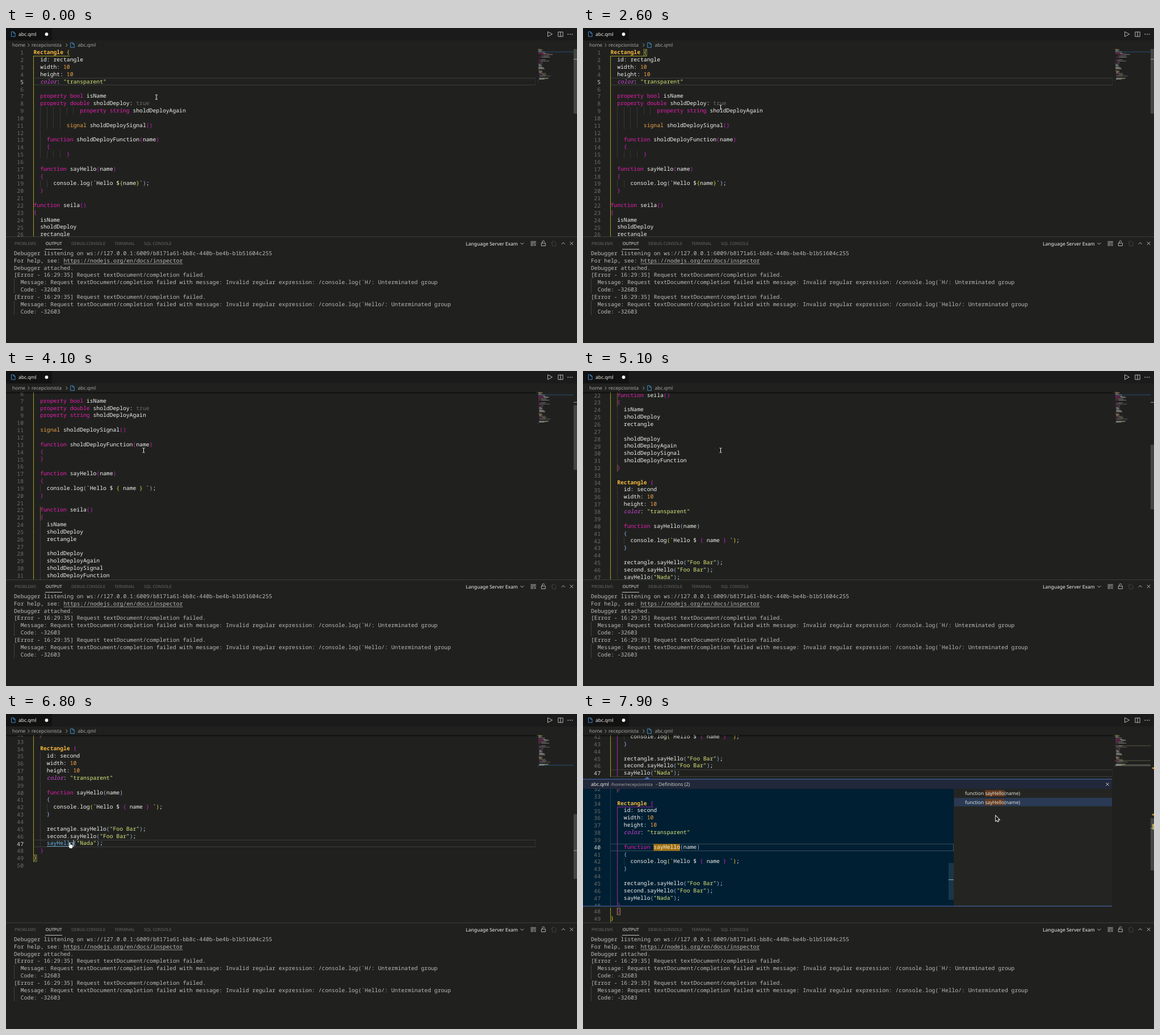
An HTML page with a canvas for the animation above (8 s loop, 1006 px wide and 556 px high).

```html
<!DOCTYPE html>
<html lang="en">
<head>
<meta charset="utf-8">
<title>Editor</title>
<style>
html, body { margin: 0; width: 100%; height: 100%; overflow: hidden; background: #20211f; }
canvas { display: block; }
</style>
</head>
<body>
<canvas id="stage" width="1006" height="556"></canvas>
<script type="text/plain" id="code">Rectangle {
  id: rectangle
  width: 10
  height: 10
  color: "transparent"

  property bool isName
  property double sholdDeploy: true
  property string sholdDeployAgain

  signal sholdDeploySignal()

  function sholdDeployFunction(name)
  {
  }

  function sayHello(name)
  {
    console.log(`Hello $ { name } `);
  }

  function seila()
  {
    isName
    sholdDeploy
    rectangle

    sholdDeploy
    sholdDeployAgain
    sholdDeploySignal
    sholdDeployFunction
  }

  Rectangle {
    id: second
    width: 10
    height: 10
    color: "transparent"

    function sayHello(name)
    {
      console.log(`Hello $ { name } `);
    }

    rectangle.sayHello("Foo Bar");
    second.sayHello("Foo Bar");
    sayHello("Nada");
  }
}
</script>
<script type="text/plain" id="log">Debugger listening on ws://127.0.0.1:6009/b8171a61-bb8c-440b-be4b-b1b51604c255
For help, see: https://nodejs.org/en/docs/inspector
Debugger attached.
[Error - 16:29:35] Request textDocument/completion failed.
  Message: Request textDocument/completion failed with message: Invalid regular expression: /console.log(`H/: Unterminated group
  Code: -32603
[Error - 16:29:35] Request textDocument/completion failed.
  Message: Request textDocument/completion failed with message: Invalid regular expression: /console.log(`Hello/: Unterminated group
  Code: -32603</script>
<script>
const ctx = document.getElementById('stage').getContext('2d');
const LOOP = 8000, STEP = 100;
const LH = 12.844, CW = 5.832, LEFT = 48.5, TOP = 37, BOTTOM = 368;
const TICK = 33.8, PEEK_SCROLL = 529.8, ZONE = 18 * LH;
const MONO = '9.72px "Noto Sans Mono", "DejaVu Sans Mono", monospace';
const SANS = '"Noto Sans", "Open Sans", sans-serif';
const UI = '8.5px ' + SANS, SMALL = '7.3px ' + SANS;
const BG = '#20211f', FG = '#f2f2ee', GREY = '#a9aaa6', DIM = '#3d3e3a', OLIVE = '#a89f2a';
const PINK = '#e61fae', ORANGE = '#eda145', GOLD = '#e3d42c', MAGENTA = '#cf1fc0', BLUE = '#8fb4e8';
const PAIRS = [GOLD, MAGENTA, BLUE];
const WORDS = { property: PINK, bool: PINK, double: PINK, string: PINK, function: PINK,
  signal: ORANGE, true: '#6c6d69', Rectangle: '#f6b73c', color: '#cf45d8', 10: ORANGE };
const USER = 'recepcionista';

// Splits source lines into coloured tokens; brackets cycle colours by depth.
function parse(lines) {
  let depth = 0;
  return lines.map(line => ({
    indent: line.trim() ? line.search(/\S/) : -1,
    tokens: [...line.matchAll(/"[^"]*"|\w+|[^\w\s"]/g)].map(({ 0: text, index: col }) => {
      let color = WORDS[text] || (text[0] === '"' ? '#dce67c' : FG);
      if (/[{(]/.test(text)) color = PAIRS[depth++ % 3];
      else if (/[})]/.test(text)) color = PAIRS[--depth % 3];
      return { text, col, color };
    })
  }));
}

const source = document.getElementById('code').textContent.split('\n');
const extra = { 9: 12, 11: 8, 13: 2, 14: 2, 15: 8, 19: 2 };
const messy = source.map((line, i) => {
  if (i > 20 && i < 32) return line.slice(2);
  if (i === 18) line = line.replace('$ { name } ', '${name}');
  return ' '.repeat(extra[i + 1] || 0) + line;
});
const tidy = parse(source), untidy = parse(messy);
const logLines = document.getElementById('log').textContent.split('\n');

function rect(x, y, w, h, color) { ctx.fillStyle = color; ctx.fillRect(x, y, w, h); }
function frame(x, y, w, h, color) { ctx.strokeStyle = color; ctx.lineWidth = 1; ctx.strokeRect(x, y, w, h); }
function say(text, x, y, color, font = UI) {
  ctx.font = font; ctx.fillStyle = color; ctx.fillText(text, x, y);
}
function path(d, x, y, stroke, fill, width = 0.9) {
  const p = new Path2D(d);
  ctx.save();
  ctx.translate(x, y);
  ctx.lineWidth = width;
  if (stroke) { ctx.strokeStyle = stroke; ctx.stroke(p); }
  if (fill) { ctx.fillStyle = fill; ctx.fill(p); }
  ctx.restore();
}
function clipped(x, y, w, h, draw) {
  ctx.save(); ctx.beginPath(); ctx.rect(x, y, w, h); ctx.clip(); draw(); ctx.restore();
}
const colX = col => LEFT + col * CW;
const guideX = col => Math.round(colX(col) - 0.3);

function indentAt(lines, i) {
  if (lines[i].indent >= 0) return lines[i].indent;
  let a = i, b = i;
  while (a > 0 && lines[a].indent < 0) a--;
  while (b < lines.length - 1 && lines[b].indent < 0) b++;
  return Math.max(0, Math.min(lines[a].indent, lines[b].indent));
}

function editor(lines, o) {
  const lineY = i => o.top - o.scroll + i * LH + (o.zone && i > 46 ? ZONE : 0);
  const from = Math.round(lineY(o.active - 1)) + 0.5;
  frame(LEFT, from, o.right - LEFT, 12, o.lineColor || DIM);
  if (o.mark) rect(colX(13), from, 8 * CW, 12, '#a3700f');
  lines.forEach((line, i) => {
    const y = lineY(i);
    if (y < o.top - LH || y > o.bottom) return;
    const n = i + 1, indent = indentAt(lines, i);
    for (let c = 2; c < indent; c += 2) rect(guideX(c), y, 0.8, LH, o.guide || DIM);
    if (n > 1 && n < 50) rect(guideX(0), y, 1, LH, o.guide || OLIVE);
    if (o.inner && n > 34 && n < 49) rect(guideX(2), y, 1, LH, '#a32aa0');
    if (lines === tidy && [22, 23, 32].includes(n)) rect(guideX(2), y, 0.8, LH, '#8a7a20');
    ctx.textAlign = 'right';
    say(n, 31, y + 10.3, n === o.active ? '#d4d5d0' : '#6d6f6a', MONO);
    ctx.textAlign = 'left';
    for (const { text, col, color } of line.tokens) {
      const link = o.link && n === 47 && text === 'sayHello';
      const style = text === 'Rectangle' ? 'bold ' : text === 'color' ? 'italic ' : '';
      say(text, colX(col), y + 9.2, link ? '#6cb8ee' : color, style + MONO);
      if (link) rect(colX(col), y + 10.8, 8 * CW, 0.8, '#6cb8ee');
    }
  });
  const [row, end, col] = o.inner ? [33, 124, 2] : [0, 112, 0];
  rect(guideX(col), lineY(row) + 12.1, end - guideX(col), 1, o.inner ? '#a32aa0' : OLIVE);
  for (const [i, c] of o.boxes || [])
    frame(colX(c) + 0.2, lineY(i) + 0.8, CW - 0.6, LH - 1.4, '#8f8b45');
  if (o.caret) rect(colX(o.caret), from, 1, 12, '#f4f4f0');
}

function minimap(lines, active, peek) {
  const row = 1.15, col = 0.57;
  const band = (n, color) => rect(937, TOP + (n - 1) * row, 63, 1.1, color);
  band(active, peek ? '#55564f' : '#264a74');
  if (peek) { band(46, '#4a4b46'); band(48, '#4a4b46'); band(17, '#55503f'); band(40, '#55503f'); }
  ctx.globalAlpha = 0.55;
  lines.forEach((line, i) => line.tokens.forEach(t =>
    rect(937 + t.col * col, TOP + i * row + 0.2, t.text.length * col, 0.85, t.color)));
  ctx.globalAlpha = 1;
}

function scrollbar(scroll, active, peek) {
  const view = BOTTOM - TOP, ratio = view / (view - LH + 50 * LH + (peek ? ZONE : 0));
  const at = n => TOP + (n - 1) * LH * ratio;
  rect(1000, TOP + scroll * ratio, 6, view * ratio, '#454642');
  if (peek) {
    rect(1003, at(17), 3, 3, '#c08a2c');
    rect(1003, at(40), 3, 3, '#c08a2c');
    rect(1003, 194, 3, 10, '#b5a45a');
  }
  rect(1000, at(active), 6, 1, '#a0a19b');
}

const CROSS = 'M-2.8-2.8L2.8 2.8M2.8-2.8L-2.8 2.8';
const FILE = 'M0 0H4L6.6 2.6V8.4H0ZM4 0V2.6H6.6';

function header() {
  rect(0, 0, 1006, 22, '#1b1b1b');
  rect(0, 0, 81, 22, '#121212');
  path(FILE, 9.5, 6.7, '#4596dc');
  say('abc.qml', 22, 14.2, FG);
  path('M2.9 0A2.9 2.9 0 1 1-2.9 0A2.9 2.9 0 1 1 2.9 0', 71.5, 11, null, FG);
  path('M0 0L8 4.3 0 8.6Z', 954.5, 6.5, '#c8c9c4');
  path('M0 0H8.4V8H0ZM4.2 0V8', 972.8, 7, '#c8c9c4');
  for (let i = 0; i < 3; i++) rect(989.5 + i * 3.6, 10.3, 1.5, 1.5, '#c8c9c4');
  say('home', 11, 33.2, GREY);
  say(USER, 45, 33.2, GREY);
  for (const x of [38.5, 105.5]) path('M0 0L2.6 2.8 0 5.6', x, 27.4, GREY);
  path(FILE, 113.7, 26, '#4596dc');
  say('abc.qml', 126.5, 33.2, GREY);
}

function panel() {
  rect(0, BOTTOM, 1006, 188, BG);
  rect(0, BOTTOM, 1006, 0.9, '#41423d');
  const tabs = { PROBLEMS: 15, OUTPUT: 69.7, 'DEBUG CONSOLE': 115, TERMINAL: 191, 'SQL CONSOLE': 243 };
  for (const [name, x] of Object.entries(tabs))
    say(name, x, 383.1, name === 'OUTPUT' ? FG : '#686964', SMALL);
  rect(69, 390, 30, 0.9, '#d8d8d4');
  say('Language Server Exam', 810, 383.6, FG);
  path('M0 0L3 3 6 0', 906.3, 379, '#c8c9c4');
  path('M0 0H9.5M0 2.3H9.5M0 4.6H5M0 6.9H5M6 4.3L9.3 7.4M9.3 4.3L6 7.4', 924.3, 377, '#c8c9c4');
  path('M0 0H7V4.8H0ZM1.5 0V-2A2 2 0 0 1 5.5-2', 943.3, 379.6, '#c8c9c4');
  path('M0 0H4L6.6 2.6V8H0ZM-2 3H1', 962.3, 376.6, '#444540');
  path('M0 3L3 0 6 3', 978.8, 378.7, '#c8c9c4');
  path(CROSS, 996.5, 380.2, '#c8c9c4');
  logLines.forEach((line, i) => {
    const y = 400.9 + i * LH;
    say(line, 14, y, '#bbbcb7', MONO);
    if (line[0] === ' ') rect(14, y - 9.6, 0.8, LH, '#4b4c47');
  });
  rect(14 + 15 * CW, 415.8, 36 * CW, 0.8, '#bbbcb7');
}

function peekView() {
  const edge = '#4a70bc';
  path('M-5 4L0 0 5 4Z', 113, 111, null, edge);
  rect(0, 115, 932, 17, '#21283a');
  say('abc.qml', 14, 127, FG);
  say('/home/' + USER, 49, 127, GREY, '7.6px ' + SANS);
  say('- Definitions (2)', 128, 127, '#cfd0cc');
  path(CROSS, 924, 124, '#d8d8d4');
  rect(0, 132, 653, 207, '#001f33');
  clipped(0, 132, 653, 207, () => editor(tidy, {
    top: 132, bottom: 339, right: 652.5, scroll: 39 * LH - 96.5, active: 40,
    inner: true, mark: true, guide: '#23404f', lineColor: '#38505c'
  }));
  rect(644, 263, 9, 65, '#193649');
  rect(644, 292, 9, 1, '#a0a8a8');
  rect(653, 132, 279, 207, '#242522');
  rect(654, 148, 278, 14.9, '#2a3a55');
  for (const y of [143, 158.6]) {
    ctx.font = UI;
    const x = 673 + ctx.measureText('function ').width;
    rect(x, y - 8.5, ctx.measureText('sayHello').width, 11, '#643a1e');
    say('function sayHello(name)', 673, y, '#e4e4e0');
  }
  for (const y of [114.6, 338.6]) rect(0, y, 932, 1, edge);
}

const ticks = [[0, 0], [3600, 1], [4100, 2], [4300, 4], [4400, 5], [5100, 8], [5200, 11], [5500, 12]];
const moves = [[0, 265, 122], [300, 265, 122], [700, 241, 98], [800, 241, 98], [1100, 243, 99],
  [1400, 275, 150], [1500, 275, 150], [1900, 243, 142], [2000, 243, 142], [2300, 242.5, 140],
  [5400, 242.5, 140], [6300, 196, 209], [6500, 113, 231], [7100, 113, 231], [7800, 820, 190],
  [7900, 729, 185], [8000, 729, 185]];

function pointer(t) {
  const k = Math.max(1, moves.findIndex(m => m[0] > t));
  const [t0, x0, y0] = moves[k - 1], [t1, x1, y1] = moves[k], p = (t - t0) / (t1 - t0);
  const x = x0 + (x1 - x0) * p, y = y0 + (y1 - y0) * p;
  if (t >= 6500 && t <= 7100)
    path('M1.5 .5q1.2-.6 1.5 .8v3.2q3 .3 4.5 1.2v2.5l-1 2.8h-4.2L0 7.2q.3-1.2 1.5-.3z', x - 3, y - 5, '#222', '#fff');
  else if (x > 653)
    path('M0 0V8.6L2 6.9 3.4 9.8 4.8 9.2 3.5 6.3H6.2Z', x - 1.8, y - 5, '#fff', '#161616', 1.8);
  else {
    const beam = 'M-2-4H-.6L0-3.5 .6-4H2M0-3.5V3.5M-2 4H-.6L0 3.5 .6 4H2';
    path(beam, x, y, '#111', null, 2);
    path(beam, x, y, '#fff', null, 1);
  }
}

function draw(t) {
  const peek = t >= 7100, active = t >= 6800 ? 47 : 5;
  const lines = t < 2900 ? untidy : tidy;
  const scroll = peek ? PEEK_SCROLL : ticks.filter(s => s[0] <= t).pop()[1] * TICK;
  const inner = t >= 7000;
  const blink = t >= 1100 && Math.floor((t - 1100) / 500) % 2 === 0;
  rect(0, 0, 1006, 556, BG);
  clipped(0, TOP, 1006, BOTTOM - TOP, () => {
    clipped(0, TOP, 933, BOTTOM - TOP, () => editor(lines, {
      top: TOP, bottom: BOTTOM, right: 933, scroll, active, inner, zone: peek,
      link: t >= 6500 && !peek,
      boxes: t < 1100 ? [] : inner ? [[33, 12], [47, 2]] : [[0, 10], [48, 0]],
      caret: active === 47 ? (peek ? 0 : 12) : blink && 22
    }));
    minimap(lines, active, peek);
    scrollbar(scroll, active, peek);
    if (scroll) {
      const shade = ctx.createLinearGradient(0, TOP, 0, TOP + 4);
      shade.addColorStop(0, 'rgba(0,0,0,.55)');
      shade.addColorStop(1, 'rgba(0,0,0,0)');
      rect(0, TOP, 933, 4, shade);
    }
    if (peek) peekView();
  });
  header();
  panel();
  pointer(t);
}

ctx.textRendering = 'geometricPrecision';
let last = -1;
function tick(now) {
  const t = Math.floor(now % LOOP / STEP) * STEP;
  if (t !== last) draw(last = t);
  requestAnimationFrame(tick);
}
tick(0);
</script>
</body>
</html>
```
